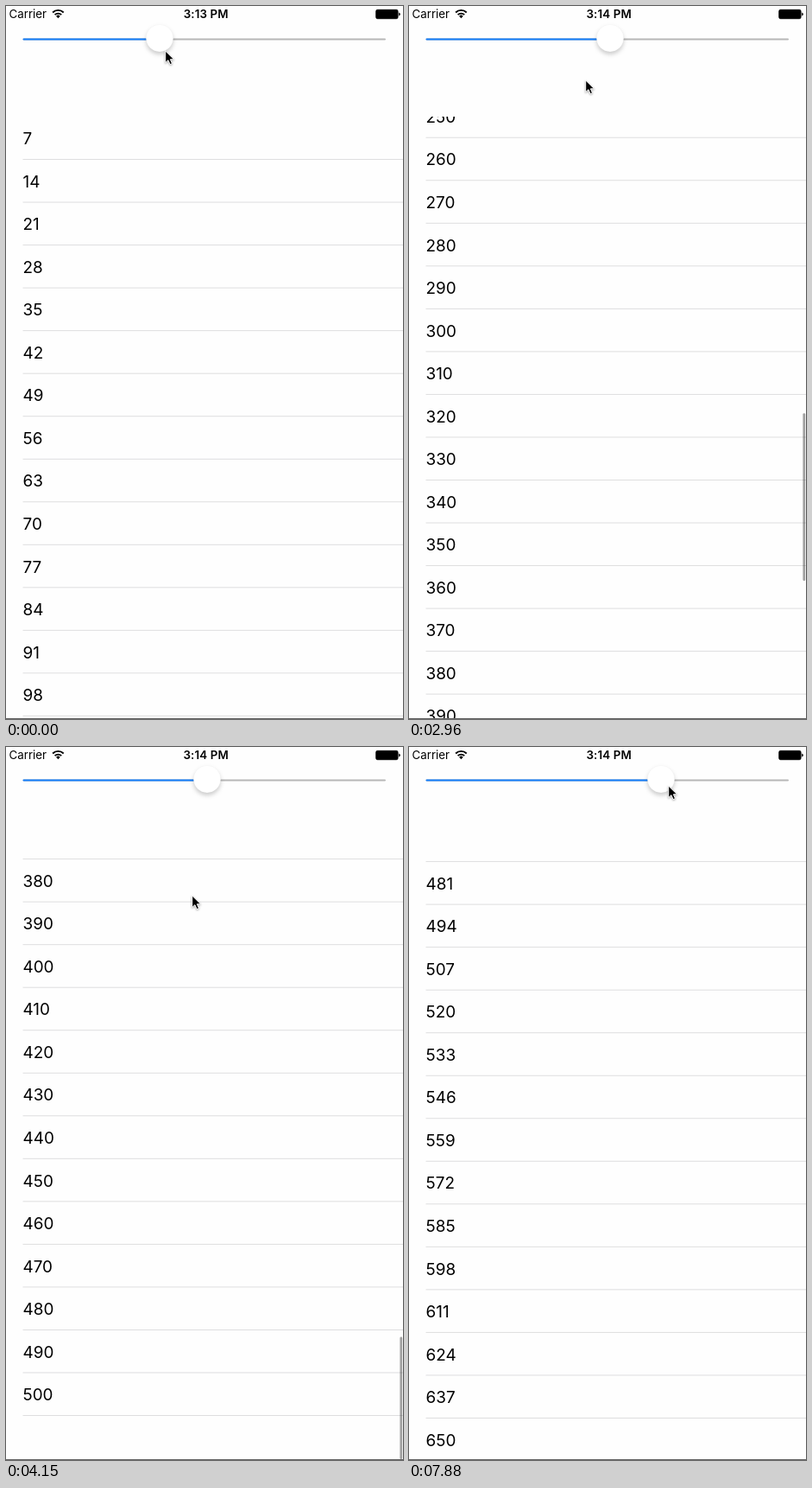
These frames come from a looping animation (460 by 825 pixels, 8 s). An HTML page:

```html
<!DOCTYPE html>
<html lang="en">
<head>
<meta charset="utf-8">
<title>Multiplication table</title>
<style>
  html, body { margin: 0; width: 100%; height: 100%; overflow: hidden; background: #fefefe; }
  svg { display: block; font-family: Inter, Roboto, sans-serif; }
  #rows text { font-size: 18.9px; }
  .status { font-size: 13.3px; }
  #thumb { filter: drop-shadow(0 3px 2.5px rgba(0, 0, 0, .2)); }
  #cursor { filter: drop-shadow(0 1px 1px rgba(0, 0, 0, .35)); }
</style>
</head>
<body>
<svg width="460" height="825" viewBox="0 0 460 825">
  <clipPath id="view"><rect y="128" width="460" height="697"/></clipPath>

  <text class="status" x="3.5" y="14.3">Carrier</text>
  <g fill="none" stroke="#000" stroke-width="1.9">
    <path d="M54.1 7.5a8.9 8.9 0 0 1 12.6 0M56.6 10.2a5.4 5.4 0 0 1 7.6 0"/>
    <path d="M60.4 14.2l-2.3-2.4a3.2 3.2 0 0 1 4.6 0z" fill="#000" stroke="none"/>
  </g>
  <text class="status" id="clock" x="231.7" y="14.3" font-weight="600" letter-spacing=".15" text-anchor="middle"></text>
  <rect x="428.7" y="4.3" width="25.4" height="10.4" rx="1.8" stroke="#000" stroke-width=".8"/>
  <path d="M455.2 7.5q1.6 .4 1.6 2t-1.6 2z"/>

  <rect x="19.5" y="37.4" width="420.5" height="2.2" rx="1.1" fill="#b7b7b7"/>
  <rect id="fill" x="19.5" y="37.4" height="2.2" rx="1.1" fill="#147efb"/>
  <circle id="thumb" cy="37.2" r="15.7" fill="#fff" stroke="#000" stroke-opacity=".04" stroke-width=".6"/>

  <g clip-path="url(#view)">
    <g id="rows"></g>
    <rect id="bar" x="456.4" width="2.8" rx="1.4" fill="#000" fill-opacity=".37"/>
  </g>
  <rect y="824" width="460" height="1" fill="#666"/>
  <path id="cursor" d="M.7 1V14.6L3.9 11.7 6.1 16.6 8.5 15.6 6.4 10.8H10.6Z" stroke="#fff" stroke-width="1" stroke-linejoin="round"/>
</svg>
<script>
const LOOP = 8000, STEP = 148.5;
const ROWS = 50, PITCH = 49.53, TOP = 128, VIEW = 697, MAX = 1778.5;
const $ = id => document.getElementById(id);

// Key lists are [step, value, eased?]; the third entry slows the approach.
const thumbKeys = [[0, 178], [5, 233], [38, 233], [40, 241], [43, 267], [47, 292]];
const scrollKeys = [[12, 0], [14, 221], [17, 791, 1], [20, 1214], [25, 1438, 1],
  [27, 1816], [28, 1831], [32, MAX, 1]];
const barKeys = [[12, 0], [13, 1], [32, 1], [34, 0]];
const cursorKeys = [[0, 184, 51], [5, 239, 51], [6, 233, 65], [8, 233, 65], [12, 171, 351],
  [14, 186, 130], [17, 195, 508], [20, 204, 85], [22, 205, 149], [25, 210, 460],
  [27, 214, 82], [28, 215, 171], [32, 228, 110], [36, 243, 37], [38, 243, 36],
  [40, 251, 36], [43, 277, 38], [47, 299, 42], [48, 272, 38], [51, 272, 38],
  [52, 289, 41], [53, 300, 44]];
const cursorX = cursorKeys.map(([s, x]) => [s, x]);
const cursorY = cursorKeys.map(([s, , y]) => [s, y]);

function at(keys, step) {
  if (step <= keys[0][0]) return keys[0][1];
  const i = keys.findIndex(k => k[0] >= step);
  if (i < 0) return keys[keys.length - 1][1];
  const [s0, v0] = keys[i - 1], [s1, v1, eased] = keys[i];
  const f = (step - s0) / (s1 - s0);
  return v0 + (v1 - v0) * (eased ? 1 - (1 - f) ** 2 : f);
}

const labels = Array.from({ length: ROWS }, (_, i) => {
  const y = TOP + i * PITCH;
  $('rows').insertAdjacentHTML('beforeend',
    `<text x="19.5" y="${y + 32.2}"></text>` +
    `<path d="M19.5 ${y + PITCH}H460" stroke="#dededf"/>`);
  return $('rows').lastChild.previousSibling;
});

function draw(step) {
  const x = at(thumbKeys, step);
  const factor = Math.floor(1 + (x - 36) / 388 * 19);
  $('thumb').setAttribute('cx', x);
  $('fill').setAttribute('width', x - 19.5);
  $('clock').textContent = step < 3 ? '3:13 PM' : '3:14 PM';
  labels.forEach((label, i) => label.textContent = (i + 1) * factor);

  const scroll = at(scrollKeys, step), over = Math.max(0, scroll - MAX);
  $('rows').setAttribute('transform', `translate(0 ${-scroll})`);
  $('bar').setAttribute('y', TOP + 1.5 + Math.min(scroll, MAX) / (ROWS * PITCH) * VIEW + over);
  $('bar').setAttribute('height', 194 - over);
  $('bar').setAttribute('opacity', at(barKeys, step));
  $('cursor').setAttribute('transform', `translate(${at(cursorX, step)} ${at(cursorY, step)})`);
}

const start = performance.now();
function tick() {
  const t = (performance.now() - start) % LOOP;
  draw(Math.min(53, Math.floor((t + 18) / STEP)));
  requestAnimationFrame(tick);
}
tick();
</script>
</body>
</html>
```
